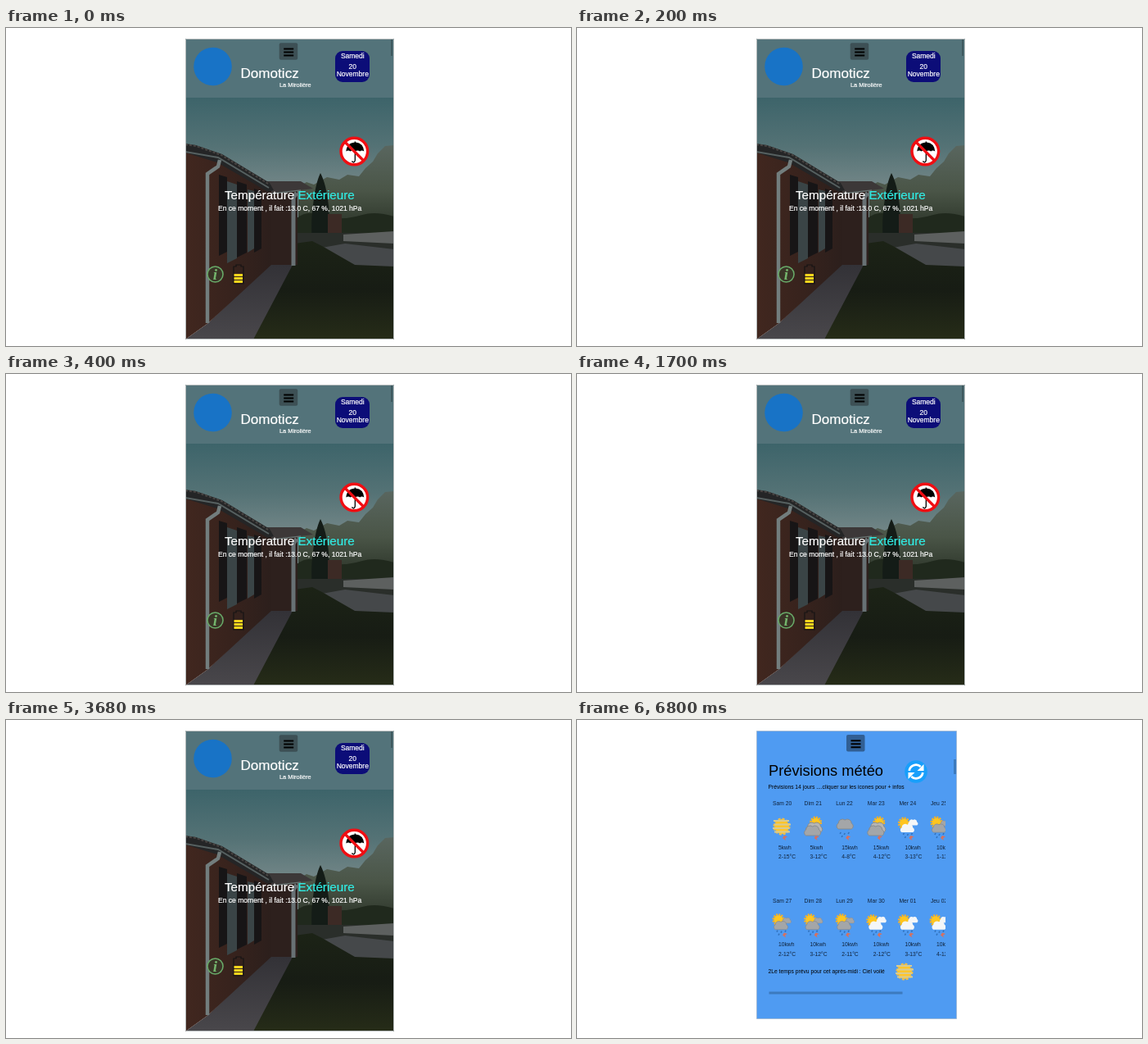
These frames come from a looping animation (690 by 388 pixels, 8000 ms). An HTML page:

```html
<!DOCTYPE html>
<html lang="fr">
<head>
<meta charset="utf-8">
<title>Domoticz</title>
<style>
html, body { margin: 0; width: 100%; height: 100%; overflow: hidden; background: #fff; }
svg { display: block; width: 690px; height: 388px; font-family: "Liberation Sans", Arial, sans-serif; }
</style>
</head>
<body>
<svg viewBox="0 0 690 388">
  <defs>
    <linearGradient id="sky" x2="0" y2="1">
      <stop offset="0" stop-color="#3d646a"/><stop offset=".35" stop-color="#547275"/><stop offset=".65" stop-color="#748788"/>
    </linearGradient>
    <linearGradient id="wall">
      <stop offset="0" stop-color="#41271f"/><stop offset=".5" stop-color="#38231d"/><stop offset="1" stop-color="#2c1f1c"/>
    </linearGradient>
    <linearGradient id="lawn" x2="0" y2="1">
      <stop offset="0" stop-color="#1c2316"/><stop offset=".5" stop-color="#171c14"/><stop offset="1" stop-color="#262c18"/>
    </linearGradient>
    <linearGradient id="path" x2="0" y2="1">
      <stop offset="0" stop-color="#323136"/><stop offset="1" stop-color="#49474b"/>
    </linearGradient>
    <linearGradient id="tree" x2="0" y2="1">
      <stop offset="0" stop-color="#59665f"/><stop offset=".5" stop-color="#4a5547"/><stop offset="1" stop-color="#252d22"/>
    </linearGradient>
    <clipPath id="photo"><path d="M219 13h255v367H219z"/></clipPath>
    <clipPath id="list"><path d="M230 90h220v205H230z"/></clipPath>

    <g id="menu">
      <rect width="22.5" height="20.5" rx="2"/>
      <path d="M5.5 7.2h12M5.5 11.2h12M5.5 15.2h12" stroke="#000" stroke-width="2"/>
    </g>
    <path id="cloud" d="M-8 6a4 4 0 0 1 0-7a5 5 0 0 1 8-4a5 5 0 0 1 8 4a4 4 0 0 1 0 7z"/>
    <g id="sun">
      <circle r="6.2" fill="none" stroke="#ffb21c" stroke-width="2.5" stroke-dasharray="2 1.2"/>
      <circle r="5.4" fill="#ffc51f"/>
    </g>
    <path id="drops" d="M-5 7l-1 2M0 8l-1 2M5 7l-1 2M-3 11l-1 2" stroke="#3273bd" stroke-width="1.6"/>
    <path id="wind" d="M0 11l4 1.5l-3 1.5l1 3l-4-3z" fill="#d9705c"/>
    <g id="veil">
      <circle r="9" fill="#ffc52c"/>
      <circle r="9.5" fill="none" stroke="#f0bd48" stroke-width="2" stroke-dasharray="3 2"/>
      <path d="M-10-7h19M-9-2.5h20M-11 2h20M-9 6.5h19" stroke="#d8cb91" stroke-width="1.8"/>
    </g>
    <g id="overcast">
      <use href="#sun" x="3" y="-5"/>
      <g stroke="#85888b" stroke-width=".9">
        <use href="#cloud" x="1" y="1" fill="#b5b5b5"/>
        <use href="#cloud" x="-1" y="5" fill="#a4a6a8"/>
      </g>
    </g>
    <g id="rain">
      <use href="#cloud" y="-3" fill="#a4a6a8" stroke="#85888b" stroke-width=".9"/>
      <use href="#drops"/>
    </g>
    <g id="showers">
      <use href="#sun" x="-4" y="-5"/>
      <g fill="#a4a6a8" stroke="#85888b" stroke-width=".8">
        <use href="#cloud" transform="translate(6 -4) scale(.55)"/>
        <use href="#cloud" transform="translate(-1 2) scale(.85)"/>
      </g>
      <use href="#drops" y="1"/>
    </g>
    <g id="bright">
      <use href="#sun" x="-5" y="-4"/>
      <g fill="#f4f6f8">
        <use href="#cloud" transform="translate(6 -5) scale(.6)"/>
        <use href="#cloud" transform="translate(-1 2) scale(.85)"/>
      </g>
      <use href="#drops" y="1"/>
    </g>
  </defs>

  <g id="home">
    <g clip-path="url(#photo)">
      <path d="M219 85h255v170H219z" fill="url(#sky)"/>
      <!-- trees and hedge -->
      <path d="M357 194l10-6 9 3 16-9 15 3 10-6 14 2 8-10 9-8 6-10 9-9 11-1v112H357z" fill="url(#tree)"/>
      <path d="M355 232q12-9 24-5t26 5 30-4 39 2v25H355z" fill="#20291d"/>
      <path d="M384 177q7 13 10 40q2 28-1 47h-19q-2-28 1-48q3-27 9-39z" fill="#141c17"/>
      <path d="M393 227h17v23h-17z" fill="#3c2a25"/>
      <!-- ground -->
      <path d="M345 250h129v60H345z" fill="#2a2e2a"/>
      <path d="M412 252l62-4v15l-62-3z" fill="#5d605f"/>
      <path d="M386 268l28-5 60 7v22l-47-2z" fill="#45484a"/>
      <path d="M345 264l29-4 12 6 40 23 48 2v89H296z" fill="url(#lawn)"/>
      <path d="M322 287l28 2-48 91h-83l28-20z" fill="url(#path)"/>
      <!-- houses -->
      <path d="M318 196h38v93h-38z" fill="#2d201d"/>
      <path d="M313 190l5-3 42 0 15 9-50 6z" fill="#3c3838"/>
      <path d="M325 202l35-4" stroke="#687372" stroke-width="1.5"/>
      <path d="M355 201l-4 6v83" fill="none" stroke="#687174" stroke-width="5"/>
      <path d="M219 148l45 12 60 37v92l-77 71-28 20z" fill="url(#wall)"/>
      <path d="M270 187l12 4v90l-12 6zM295 197l8 2v70l-8 5z" fill="#3a4446"/>
      <path d="M260 179l10 3v91l-10 5zM282 187l12 4v83l-12 6zM303 196l9 3v70l-9 5z" fill="#171516"/>
      <path d="M219 141l13 2 32 11 58 35 5 9-7 2-62-36-39-12z" fill="#242526"/>
      <path d="M219 142l13 2 31 11 59 36" fill="none" stroke="#484442" stroke-width="2" stroke-dasharray="3 2"/>
      <path d="M219 151l40 7 62 37" fill="none" stroke="#566060" stroke-width="2"/>
      <path d="M261 161l-2 8-13 9v182" fill="none" stroke="#727d7d" stroke-width="4.5"/>
      <path d="M219 13h255v72H219z" fill="#53737a"/>
    </g>
    <path d="M219.5 13.5h254v366h-254z" fill="none" stroke="#b5babb"/>
    <path d="M471 14v20" stroke="#3e585e" stroke-width="2"/>
    <circle cx="252.5" cy="47" r="23.3" fill="#1873c6"/>
    <use href="#menu" x="333.7" y="18.3" fill="#3d5055"/>
    <rect x="402" y="28" width="42" height="38" rx="9" fill="#0c0d78"/>
    <g fill="#fff" stroke="#fff" stroke-width=".2">
      <text x="286.5" y="61" font-size="17.1">Domoticz</text>
      <text x="334" y="72" font-size="7.4">La Mirolière</text>
      <g font-size="8.5" text-anchor="middle">
        <text x="423.3" y="37">Samedi</text>
        <text x="423.3" y="50">20</text>
        <text x="423.3" y="59">Novembre</text>
      </g>
      <text x="267" y="208.7" font-size="15.2">Température <tspan fill="#30eee6" stroke="#30eee6">Extérieure</tspan></text>
      <text x="259" y="222.5" font-size="8.55">En ce moment , il fait :13.0 C, 67 %, 1021 hPa</text>
    </g>
    <!-- no-umbrella sign -->
    <g transform="translate(425.3 150.5)">
      <circle r="16.3" fill="#fff" stroke="#f00d12" stroke-width="3.4"/>
      <path d="M-10 0q1-11 12-11q9 1 10 11q-3-2-5 0q-3-2-6 0q-3-2-6 0q-2-2-5 0z"/>
      <path d="M1-12v23q-1 4-4 1" fill="none" stroke="#000" stroke-width="1.3"/>
      <path d="M-11.5-11.5l23 23" stroke="#f00d12" stroke-width="3.2"/>
    </g>
    <circle cx="255.5" cy="300.5" r="9.5" fill="#3a3527" stroke="#69aa69" stroke-width="1.6"/>
    <text x="255.5" y="307" font-family="Liberation Serif, serif" font-size="19" font-style="italic" font-weight="bold" text-anchor="middle" fill="#74b56c">i</text>
    <path d="M278 312v-21h3v-2h6v2h3v21z" fill="none" stroke="#171414" stroke-width="1.2"/>
    <path d="M278.5 301.5h10.500M278.5 305.5h10.500M278.5 309.5h10.500" stroke="#f8d51d" stroke-width="2.800"/>
  </g>

  <g id="weather">
    <path d="M219.5 13.5h244v351h-244z" fill="#4f9bf2" stroke="#9cb4d0" stroke-width=".8"/>
    <use href="#menu" x="329" y="18" fill="#315f94"/>
    <text x="234" y="68" font-size="18.25">Prévisions météo</text>
    <g transform="translate(414 63)">
      <circle r="13.8" fill="#189ffb"/>
      <path id="turn" d="M-8.3-1a8.300 8.300 0 0 1 14-5" fill="none" stroke="#fff" stroke-width="2.7"/>
      <path id="tip" d="M9.5-9v8h-8z" fill="#fff"/>
      <use href="#turn" transform="rotate(180)"/>
      <use href="#tip" transform="rotate(180)"/>
    </g>
    <g font-size="6.72">
      <text x="233.5" y="83.5">Prévisions 14 jours ....cliquer sur les icones pour + infos</text>
      <g id="days" clip-path="url(#list)" fill="#10233b"></g>
      <text x="233.5" y="309.3">2Le temps prévu pour cet après-midi : Ciel voilé</text>
    </g>
    <use href="#veil" x="400" y="307"/>
    <path d="M234.5 333h163M461.5 48v18" stroke="#3c7abe" stroke-width="3"/>
  </g>
</svg>
<script>
const forecast = [
  ["Sam 20", "veil", 5, "2-15"], ["Dim 21", "overcast", 5, "3-12"],
  ["Lun 22", "rain", 15, "4-8"], ["Mar 23", "overcast", 15, "4-12"],
  ["Mer 24", "bright", 10, "3-13"], ["Jeu 25", "showers", 10, "1-11"],
  ["Sam 27", "showers", 10, "2-12"], ["Dim 28", "showers", 10, "3-12"],
  ["Lun 29", "showers", 10, "2-11"], ["Mar 30", "bright", 10, "2-12"],
  ["Mer 01", "bright", 10, "3-13"], ["Jeu 02", "bright", 10, "4-12"]
];
const byId = id => document.getElementById(id);

byId("days").innerHTML = forecast.map(([day, icon, power, temp], i) => {
  const x = 239 + i % 6 * 38.6, y = 104 + Math.floor(i / 6) * 118.6;
  return `<g transform="translate(${x} ${y})">
    <text>${day}</text>
    <use href="#${icon}" x="11" y="26"/><use href="#wind" x="14" y="26"/>
    <text x="7" y="53.5">${power}kwh</text>
    <text x="7" y="65.3">${temp}°C</text></g>`;
}).join("");

const start = performance.now();
function draw() {
  const home = (performance.now() - start) % 8000 < 5000;
  byId("home").style.display = home ? "" : "none";
  byId("weather").style.display = home ? "none" : "";
  requestAnimationFrame(draw);
}
draw();
</script>
</body>
</html>
```
